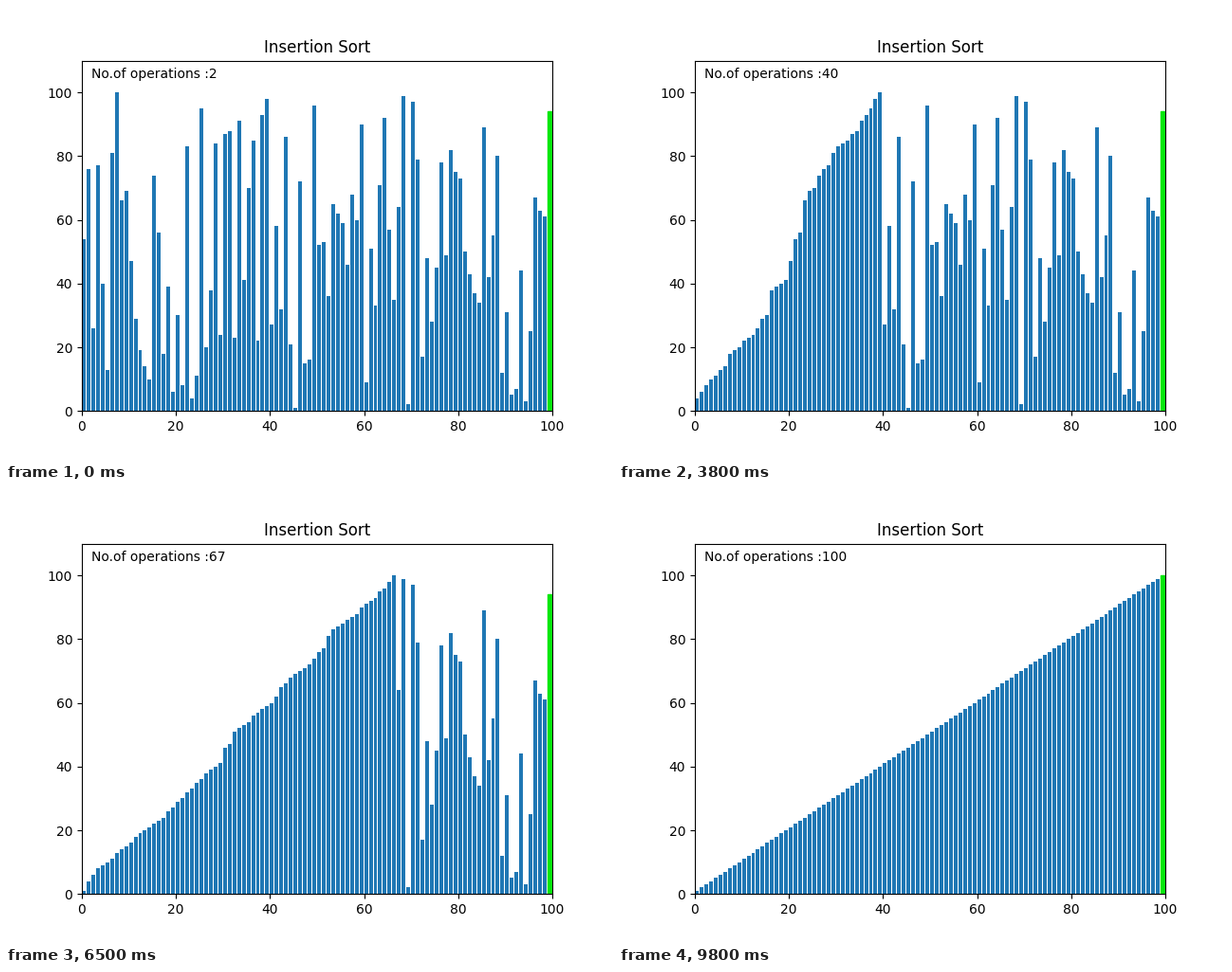
A matplotlib script that plays this animation: 640x480 px, repeating every 9.9 s.

```python
import matplotlib.pyplot as plt
from matplotlib.animation import FuncAnimation

VALUES = [
    54, 76, 26, 77, 40, 13, 81, 100, 66, 69, 47, 29, 19, 14, 10, 74, 56, 18, 39, 6,
    30, 8, 83, 4, 11, 95, 20, 38, 84, 24, 87, 88, 23, 91, 41, 70, 85, 22, 93, 98,
    27, 58, 32, 86, 21, 1, 72, 15, 16, 96, 52, 53, 36, 65, 62, 59, 46, 68, 60, 90,
    9, 51, 33, 71, 92, 57, 35, 64, 99, 2, 97, 79, 17, 48, 28, 45, 78, 49, 82, 75,
    73, 50, 43, 37, 34, 89, 42, 55, 80, 12, 31, 5, 7, 44, 3, 25, 67, 63, 61, 94,
]
COUNT = len(VALUES)
FRAMES = COUNT - 1

fig, ax = plt.subplots(figsize=(6.4, 4.8), dpi=100)
ax.set_title("Insertion Sort")
bars = ax.bar(range(COUNT), VALUES, align="edge")
bars[-1].set_color("#06e80c")
ax.set_xlim(0, COUNT)
ax.set_ylim(0, 1.1 * COUNT)
label = ax.text(0.02, 0.95, "", transform=ax.transAxes)


def update(frame):
    # Each step inserts one more value into the sorted prefix.
    done = frame + 2
    heights = sorted(VALUES[:done]) + VALUES[done:]
    for bar, height in zip(bars, heights):
        bar.set_height(height)
    label.set_text(f"No.of operations :{done}")
    return [*bars, label]


anim = FuncAnimation(fig, update, frames=FRAMES, interval=100,
                     init_func=lambda: update(0), repeat=True, repeat_delay=0)
plt.show()
```
